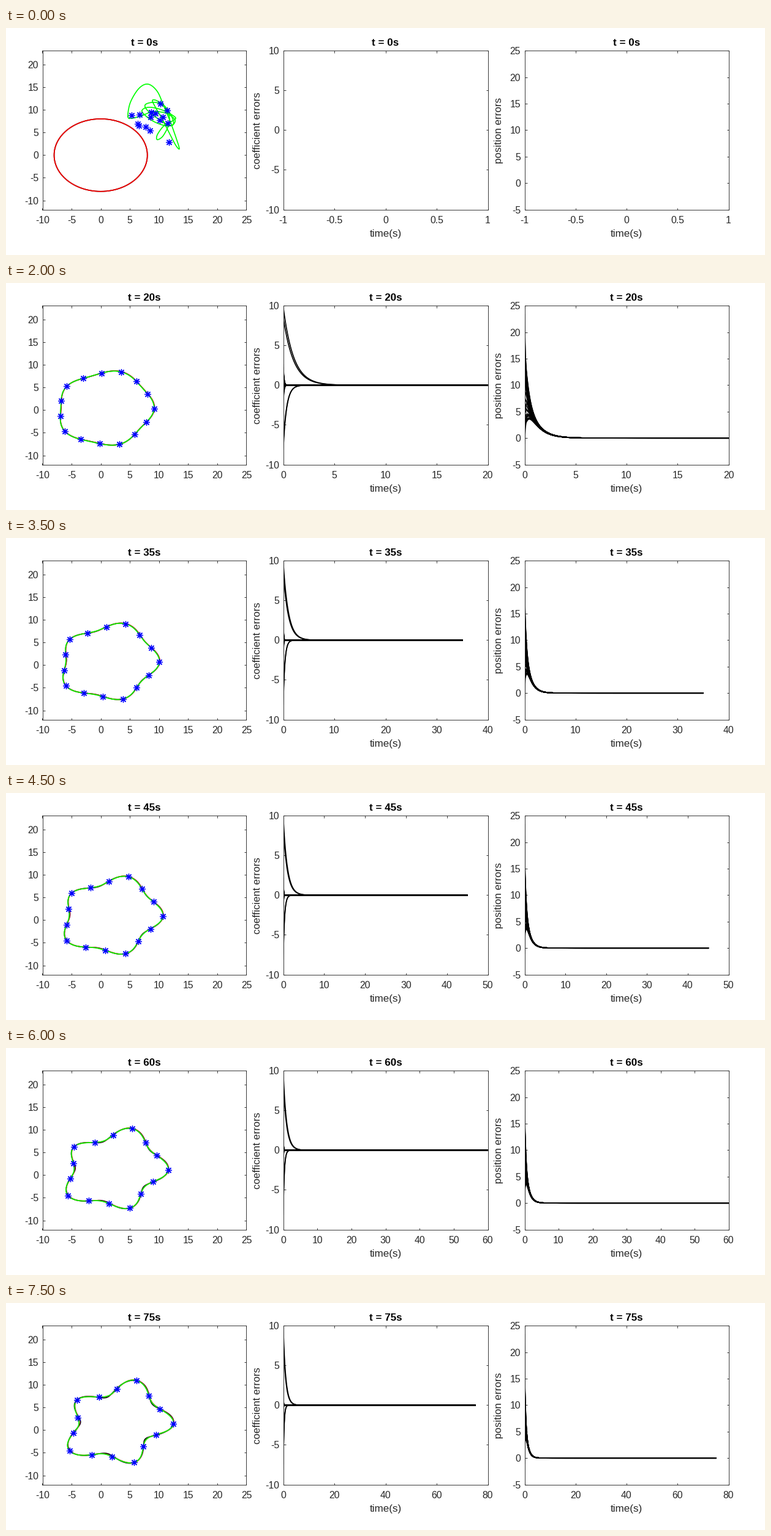
Animation of 1239 by 372 pixels, one loop 8000 ms. Source, as a matplotlib script:

```python
import numpy as np
import matplotlib.pyplot as plt
from matplotlib.animation import FuncAnimation

W, H, DPI = 1239, 372, 100
FRAMES, INTERVAL, STEP = 16, 500, 5
AGENTS, HARMONICS = 15, 6
GREY = "#262626"
PT = 72 / DPI  # points per pixel

plt.rcParams.update({
    "font.family": "Liberation Sans",
    "axes.unicode_minus": False,
    "axes.edgecolor": GREY,
    "axes.linewidth": 0.9 * PT,
})
rng = np.random.default_rng(4)
fig = plt.figure(figsize=(W / DPI, H / DPI), dpi=DPI, facecolor="white")


def px_text(x, y, s="", size=17, **kw):
    return fig.text(x / W, 1 - y / H, s, size=size * PT,
                    ha="center", va="center", **kw)


def make_axes(left, right, ylim, yticks, ylabel=None):
    top, bottom = 37.5, 297.5
    ax = fig.add_axes([left / W, 1 - bottom / H,
                       (right - left) / W, (bottom - top) / H])
    ax.set_ylim(*ylim)
    ax.set_yticks(yticks)
    ax.tick_params(direction="in", top=True, right=True, length=3.5 * PT,
                   width=0.9 * PT, color=GREY, labelcolor=GREY,
                   labelsize=15.8 * PT)
    ax.tick_params(axis="x", pad=10 * PT)
    ax.tick_params(axis="y", pad=6.5 * PT)
    mid = (left + right) / 2
    if ylabel:
        px_text(left - 42, 168, ylabel, rotation=90, color=GREY)
        px_text(mid, 337.5, "time(s)", color=GREY)
    return ax, px_text(mid, 24.5, weight="bold", color="black")


def set_ticks(ax, ticks):
    ax.set_xlim(ticks[0], ticks[-1])
    ax.set_xticks(ticks, [f"{v:g}" for v in ticks])


# --- deforming contour -------------------------------------------------
def contour(t, n=720):
    """Lobed closed curve that drifts and deepens with time."""
    a = np.linspace(0, 2 * np.pi, n + 1)
    r = 8 + 0.02 * t * np.cos(5 * a) + 0.01 * t * np.sin(2 * a)
    return (0.04 + 0.02j) * t + r * np.exp(1j * a)


def fitted(t, n=720):
    """Contour by arc length, truncated to the low harmonics."""
    z = contour(t)
    s = np.concatenate([[0], np.cumsum(np.abs(np.diff(z)))])
    u = np.arange(n) / n * s[-1]
    c = np.fft.fft(np.interp(u, s, z.real) + 1j * np.interp(u, s, z.imag))
    c[HARMONICS + 1:-HARMONICS] = 0
    z = np.fft.ifft(c)
    return np.append(z, z[0])


def smooth_loop(p, n=16):
    """Closed Catmull-Rom curve through complex points."""
    a, b, c, d = (np.roll(p, k)[:, None] for k in (1, 0, -1, -2))
    u = np.arange(n) / n
    z = 0.5 * (2 * b + (c - a) * u + (2 * a - 5 * b + 4 * c - d) * u**2
               + (3 * b - a - 3 * c + d) * u**3).ravel()
    return np.append(z, z[0])


def to_data(points):
    x, y = np.array(points, float).T
    return (x - 59.5) / 333 * 35 - 10 + 1j * ((297.5 - y) / 260 * 35 - 12)


START_LOOP = smooth_loop(to_data([
    (199, 145), (203, 122), (217, 99), (232, 92), (247, 104), (258, 129),
    (268, 153), (278, 181), (283, 198), (277, 192), (266, 171), (255, 149),
    (245, 132), (239, 119), (246, 119), (259, 128), (270, 144), (273, 158),
    (260, 160), (239, 152), (222, 137), (232, 130), (254, 134), (276, 146),
    (272, 152), (258, 160), (247, 175), (247, 183), (257, 176), (267, 153),
    (261, 131), (245, 122), (228, 125), (230, 134), (247, 148), (268, 160),
    (276, 151), (262, 140), (240, 137), (221, 144), (205, 148)]))
START_AGENTS = to_data([
    (205, 143), (218, 142), (252, 124.5), (237, 138.5), (244.5, 140.5),
    (263.5, 135.5), (236.5, 146), (251.5, 151.5), (256.5, 146.5),
    (264.5, 156), (215.5, 157), (217.5, 160.5), (228, 162.5),
    (235.5, 168.5), (265.5, 187.5)])

# --- decaying errors ---------------------------------------------------
# rows of (amplitude, rate) pairs summed per curve
small = rng.uniform(-2.2, 2.3, 22)
small[:2] = 2.6, -2.2
coef_terms = [[(9.9, 1)], [(8.6, 1.0)], [(-8.1, 3)], [(-7.4, 2.9)]]
coef_terms += [[(1.25 * a, 11), (-0.25 * a, 7)] for a in small]

ang = 2 * np.pi * np.arange(AGENTS) / AGENTS
slow = np.repeat([9.9, 8.6], AGENTS)
mid = np.concatenate([-8 * np.cos(ang), -7.4 * np.sin(ang)])
first = np.clip(slow + mid + rng.normal(0, 2.5, 2 * AGENTS), -1, 16.4)
order = np.argsort(first)
first[order[-1]], first[order[-2]], first[order[0]] = 23.4, 21.2, -1
pos_terms = [[(a, 1), (b, 3), (f - a - b, 14)]
             for a, b, f in zip(slow, mid, first)]


def decay(terms, t):
    return sum(a * np.exp(-k * t) for a, k in terms)


# --- stage -------------------------------------------------------------
ax_map, title_map = make_axes(59.5, 392.5, (-12, 23), range(-10, 21, 5))
ax_coef, title_coef = make_axes(452.5, 786.5, (-10, 10),
                                range(-10, 11, 5), "coefficient errors")
ax_pos, title_pos = make_axes(846.5, 1179.5, (-5, 25),
                              range(-5, 26, 5), "position errors")
set_ticks(ax_map, np.arange(-10, 26, 5))

LW = 1.7 * PT
shape, wanted, estimate = (ax_map.plot([], [], color=c, lw=LW)[0]
                           for c in ("black", "red", "lime"))
agents, = ax_map.plot([], [], ls="none", marker=(8, 2, 0), ms=11 * PT,
                      mec="blue", mew=1.3 * PT, zorder=5)
plots = [(terms, ax.plot([], [], color="black", lw=LW)[0])
         for ax, rows in ((ax_coef, coef_terms), (ax_pos, pos_terms))
         for terms in rows]


def time_ticks(t):
    if t == 0:
        return np.arange(-1, 1.1, 0.5)
    step = next(s for s in (1, 2, 5, 10, 20) if np.ceil(t / s) <= 6)
    return np.arange(np.ceil(t / step) + 1) * step


def put(line, z):
    line.set_data(z.real, z.imag)


def draw(i):
    t = i * STEP
    for title in (title_map, title_coef, title_pos):
        title.set_text(f"t = {t}s")
    for ax in (ax_coef, ax_pos):
        set_ticks(ax, time_ticks(t))

    put(shape, contour(t))
    put(wanted, fitted(t))
    # the estimate trails the wanted curve by about one second
    z = fitted(t - 1) if t else START_LOOP
    put(estimate, z)
    put(agents, z[:-1:(len(z) - 1) // AGENTS] if t else START_AGENTS)

    ts = t * np.linspace(0, 1, 400) ** 2
    for terms, line in plots:
        line.set_data(ts, decay(terms, ts))
        line.set_visible(t > 0)
    return []


anim = FuncAnimation(fig, draw, frames=FRAMES, interval=INTERVAL,
                     repeat=True, repeat_delay=0, blit=False)
plt.show()
```
